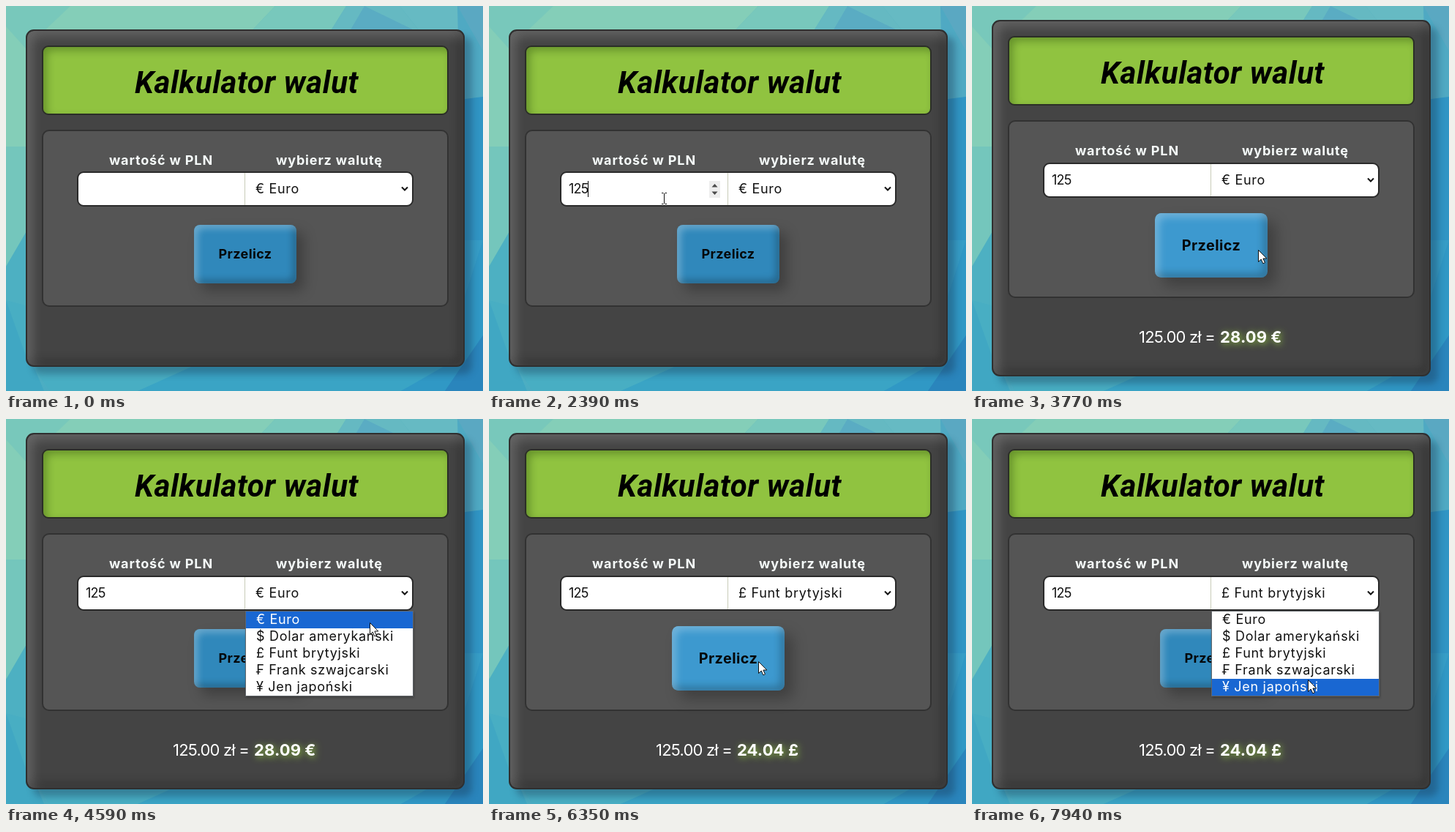
An HTML page that plays this animation: 652 px wide and 526 px high, repeating every 8 s.

```html
<!DOCTYPE html>
<html lang="pl">
<head>
<meta charset="utf-8">
<title>Kalkulator walut</title>
<style>
html, body { margin: 0; width: 100%; height: 100%; overflow: hidden; }
#stage { position: relative; width: 652px; height: 526px; overflow: hidden; background: #55b5c0;
  font: 400 18px Inter, "Open Sans", sans-serif; letter-spacing: .7px; color: #111; }
#stage div, svg { position: absolute; box-sizing: border-box; white-space: pre; }
#bg, #over { left: 0; top: 0; }
#outer, #inner { left: 0; top: 0; width: 0; height: 0; }
#panel { left: 27px; top: 32px; width: 600px; border: 2px solid #2f2f2f; border-radius: 11px;
  background: #444;
  box-shadow: 10px 10px 10px rgba(20,45,70,.34), inset 6px 6px 16px rgba(255,255,255,.2), inset -6px -6px 14px rgba(0,0,0,.27); }
#title { left: 49px; top: 54px; width: 556px; height: 95px; border: 2px solid #2b2e27; border-radius: 9px;
  background: #90c340; box-shadow: inset 5px 5px 11px rgba(20,50,0,.32);
  font: italic 600 42px/95px Roboto, sans-serif; letter-spacing: .6px; color: #000; text-align: center; }
#title span { position: relative; left: 2px; top: 1px; }
#form { left: 49px; top: 169px; width: 556px; border: 2px solid #323232; border-radius: 10px; background: #555; }
.label { top: 198px; height: 25px; line-height: 25px; font-weight: 700; letter-spacing: .85px; color: #f6fbfa; }
#field { left: 97px; top: 226px; width: 460px; height: 48px; border: 2px solid #2a2a2a; border-radius: 9px; background: #fff; }
#split { left: 227px; top: 0; width: 1px; height: 44px; background: #c9ccb9; }
#value, #choice { top: 0; height: 44px; line-height: 44px; }
#value { left: 10px; letter-spacing: -.8px; }
#choice { left: 242px; }
#caret { top: 11px; width: 1px; height: 22px; background: #000; }
#spin { left: 202px; top: 11px; }
#arrow { left: 440px; top: 17px; }
#button { left: 257px; top: 299px; width: 140px; height: 80px; border-radius: 8px;
  font-weight: 700; line-height: 79px; text-align: center; letter-spacing: .4px; color: #050708;
  box-shadow: 10px 10px 18px rgba(0,0,0,.27), inset 5px 5px 10px rgba(255,255,255,.28), inset -5px -5px 10px rgba(0,0,0,.24); }
#result { left: 228px; top: 437px; height: 30px; line-height: 30px; font-size: 22px; letter-spacing: -.8px; color: #fff; }
#sum { left: 111px; top: 0; font-weight: 700; letter-spacing: .1px; text-shadow: 2px 2px 10px #8fc23f; }
#list { left: 327px; top: 262px; width: 230px; height: 117px; border: 1px solid #62666a; background: #fff;
  box-shadow: 1px 2px 3px rgba(0,0,0,.25); }
#list div { left: 0; width: 228px; height: 23px; line-height: 21px; padding-left: 14px; }
</style>
</head>
<body>
<div id="stage">
  <svg id="bg" width="652" height="526">
    <defs>
      <linearGradient id="sky" x1="0" y1="0" x2="1" y2="1">
        <stop offset="0" stop-color="#7fccb9"/><stop offset=".5" stop-color="#4eb0c3"/><stop offset="1" stop-color="#2b85bd"/>
      </linearGradient>
    </defs>
    <rect width="652" height="526" fill="url(#sky)"/>
    <path fill="#84ceb8" d="M0 0H368L330 40H27V192H0z"/>
    <path fill="#78c8bb" d="M0 0H88L27 58L0 28z"/>
    <path fill="#74c6bc" d="M0 192H28V308L0 356z"/>
    <path fill="#4db0c2" d="M28 308V486L0 402V356z"/>
    <path fill="#40a7c3" d="M0 402L52 526H0z"/>
    <path fill="#48aec3" d="M0 402L28 480L60 526H180L300 480z"/>
    <path fill="#3aa4c5" d="M180 526L260 490H610L540 526z"/>
    <path fill="#78c8bc" d="M368 0H465L440 40H330z"/>
    <path fill="#65b9c2" d="M465 0H538L570 40H440z"/>
    <path fill="#5aacc3" d="M490 0L560 34H470z"/>
    <path fill="#66bac3" d="M538 0H617L627 40H570z"/>
    <path fill="#5aa8c2" d="M617 0H652V62z"/>
    <path fill="#4fa9c3" d="M617 0L652 62V124L620 128z"/>
    <path fill="#3095c4" d="M620 128L652 124V320H620z"/>
    <path fill="#369dc6" d="M620 320H652L620 420z"/>
    <path fill="#3098c5" d="M652 320V450L600 526H540L620 480V420z"/>
    <path fill="#2a85bc" d="M652 450V526H600z"/>
  </svg>
  <div id="outer">
    <div id="panel"></div>
    <div id="title"><span>Kalkulator walut</span></div>
    <div id="form"></div>
    <div class="label" style="left:141px">wartość w PLN</div>
    <div class="label" style="left:369px">wybierz walutę</div>
  </div>
  <div id="inner">
    <div id="field">
      <div id="value"></div>
      <div id="caret"></div>
      <svg id="spin" width="15" height="23"><rect width="15" height="23" fill="#ededed"/><path fill="#4a4a4a" d="M3.5 8.5L7.5 4L11.5 8.5zM3.5 14.5H11.5L7.5 19z"/></svg>
      <div id="split"></div>
      <div id="choice"></div>
      <svg id="arrow" width="12" height="10"><path d="M2 2.5L6 6.5L10 2.5" fill="none" stroke="#111" stroke-width="2"/></svg>
    </div>
    <div id="button">Przelicz</div>
  </div>
  <div id="result">125.00 zł = <div id="sum"></div></div>
  <div id="list"></div>
  <svg id="over" width="652" height="526">
    <circle id="press" r="12" fill="#fff047" fill-opacity=".7"/>
    <path id="hand" fill="#fff" stroke="#111" d="M.5 .5V16.5L4.2 13L6.8 18.8L9.4 17.7L6.9 12H11.8z"/>
    <path id="beam" fill="none" stroke="#111" d="M-3 -7.5H-.5M1.5 -7.5H4M.5 -7V7M-3 7.5H-.5M1.5 7.5H4"/>
  </svg>
</div>
<script>
const LOOP = 8000, HOVER_MS = 340;
const $ = id => document.getElementById(id);
const currencies = ['€ Euro', '$ Dolar amerykański', '£ Funt brytyjski', '₣ Frank szwajcarski', '¥ Jen japoński'];

// pointer stops: time, x, y
const path = [
  [130, 584, 524], [760, 208, 248], [2180, 208, 248], [2980, 391, 333],
  [3770, 391, 333], [4270, 546, 213], [4400, 541, 239], [4520, 541, 239],
  [4590, 497, 278], [4730, 478, 305], [4910, 478, 305], [5040, 465, 318],
  [5110, 465, 318], [5500, 368, 331], [6370, 368, 331], [6910, 539, 254],
  [7050, 541, 240], [7250, 541, 240], [7750, 472, 347], [7940, 459, 356]
];
const presses = [[960, 1030], [3090, 3200], [4400, 4500], [5040, 5110], [6140, 6220], [7110, 7250]];
const hovers = [[470, 590], [2735, 3870], [5280, 6520]];
const opens = [[4450, 5110], [7170, LOOP]];
const keys = [1430, 1710, 1980];

const rows = currencies.map((name, i) => {
  const row = document.createElement('div');
  row.textContent = name;
  row.style.top = i * 23 + 'px';
  $('list').append(row);
  return row;
});

const clamp = v => Math.max(0, Math.min(1, v));
const smooth = v => v * v * (3 - 2 * v);
const within = (t, spans) => spans.some(([a, b]) => t >= a && t < b);
const show = (id, on) => { $(id).style.display = on ? '' : 'none'; };
const mix = (a, b, k) => 'rgb(' + a.map((v, i) => Math.round(v + (b[i] - v) * k)) + ')';

function pointer(t) {
  const i = path.findIndex(p => p[0] > t);
  if (i < 0) return path[path.length - 1].slice(1);
  if (!i) return path[0].slice(1);
  const [ta, xa, ya] = path[i - 1], [tb, xb, yb] = path[i];
  const k = smooth((t - ta) / (tb - ta));
  return [xa + (xb - xa) * k, ya + (yb - ya) * k];
}

function hover(t) {
  return smooth(Math.max(...hovers.map(([a, b]) =>
    clamp((Math.min(t, b) - a) / HOVER_MS) - Math.max(0, t - b) / HOVER_MS), 0));
}

function draw(t) {
  const done = t >= 3200;
  const chosen = t >= 5110 ? 2 : 0;
  const [x, y] = pointer(t);

  $('outer').style.transform = `translateY(${done ? -13 : 0}px)`;
  $('inner').style.transform = `translateY(${done ? -12 : 0}px)`;
  $('panel').style.height = (done ? 487 : 461) + 'px';
  $('form').style.height = (done ? 243 : 242) + 'px';
  show('result', done);
  $('sum').textContent = t >= 6220 ? '24.04 £' : '28.09 €';

  const typed = keys.filter(k => t >= k);
  $('value').textContent = '125'.slice(0, typed.length);
  $('caret').style.left = [10, 17, 26, 36][typed.length] + 'px';
  const lastKey = typed.length ? typed[typed.length - 1] : 960;
  show('caret', t >= 960 && t < 3090 && (t - lastKey) % 1060 < 530);
  show('spin', t >= 680 && t < 3090);
  $('choice').textContent = currencies[chosen];

  const h = hover(t);
  $('button').style.transform = `scale(${1 + .1 * h})`;
  $('button').style.backgroundColor = mix([48, 136, 187], [61, 153, 207], h);

  show('list', within(t, opens));
  const lit = y >= 263 ? Math.min(4, Math.floor((y - 263) / 23)) : chosen;
  rows.forEach((row, i) => {
    row.style.background = i === lit ? '#1967d2' : '#fff';
    row.style.color = i === lit ? '#fff' : '#111';
  });

  const text = x > 98 && x < 326 && y > 227 && y < 273;
  const at = `translate(${Math.round(x)} ${Math.round(y)})`;
  for (const id of ['hand', 'beam', 'press']) $(id).setAttribute('transform', at);
  show('hand', t >= 130 && !text);
  show('beam', t >= 130 && text);
  show('press', within(t, presses));
}

function tick() {
  draw(performance.now() % LOOP);
  requestAnimationFrame(tick);
}
tick();
</script>
</body>
</html>
```
